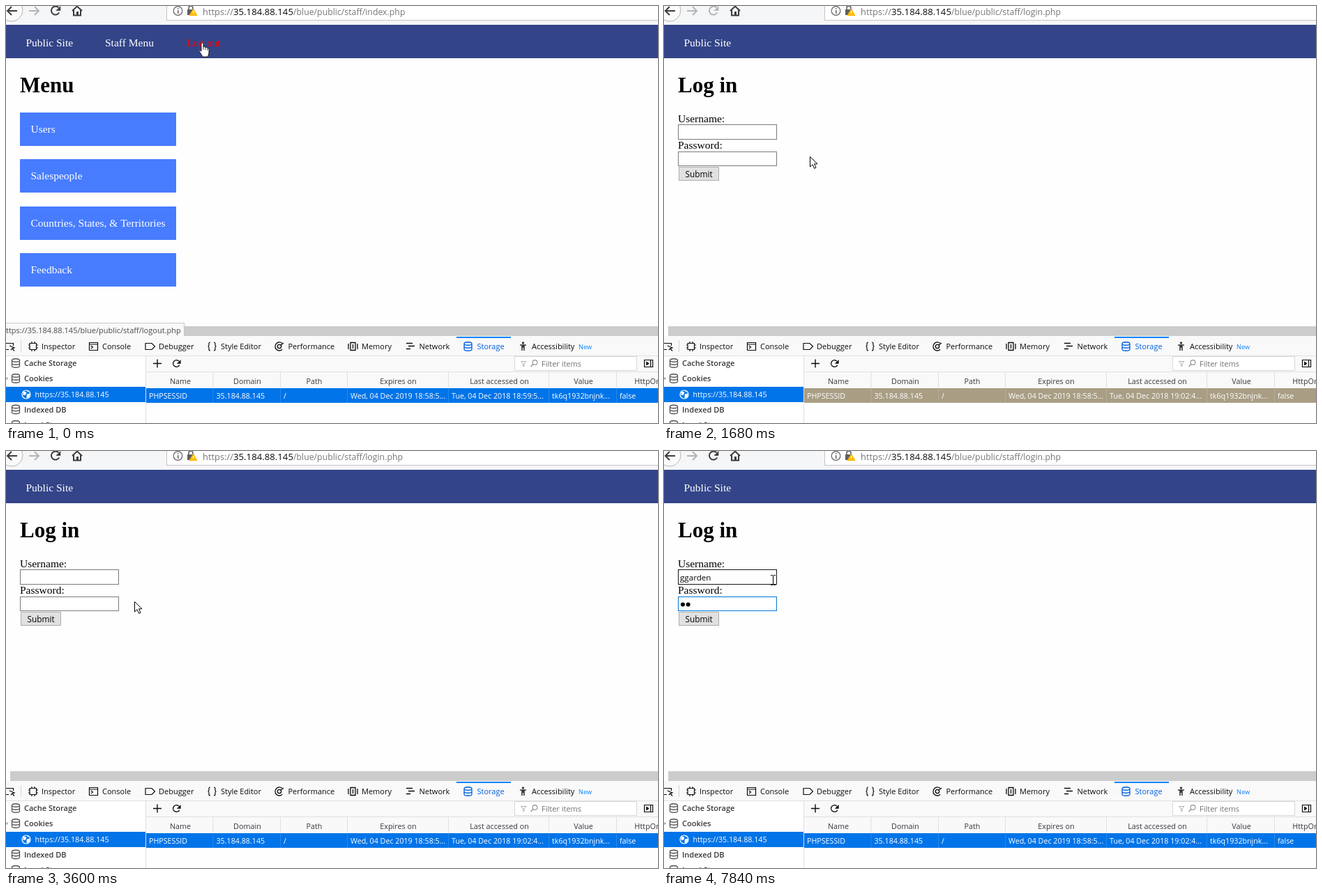
Write an HTML page with a canvas that moves like this. It is 935 by 599 pixels and loops after 7.99 s.

```html
<!DOCTYPE html>
<html lang="en">
<head>
<meta charset="utf-8">
<title>Log out and log in</title>
<style>
  html, body { margin: 0; width: 100%; height: 100%; overflow: hidden; background: #fff; }
  canvas { display: block; }
</style>
</head>
<body>
<canvas id="stage" width="935" height="599"></canvas>
<script>
const ctx = document.getElementById('stage').getContext('2d');
const LOOP = 7990;
const UI = '"Open Sans", "Noto Sans", sans-serif';
const SERIF = '"Liberation Serif", serif';
const INK = '#0c0c0d', GREY = '#b4b4b6', BLUE = '#0074e8';
const HOST = '35.184.88.145';
const USER = 'ggarden';

// The last entry whose start time has passed.
const at = (steps, t) => steps.filter(s => s[0] <= t).pop().slice(1);

const CURSOR = [
  [0, 'hand', 276, 52], [1270, 'arrow', 302, 168], [1410, 'arrow', 310, 239],
  [1560, 'arrow', 260, 238], [1680, 'arrow', 209, 216], [3600, 'arrow', 184, 216],
  [3760, 'beam', 162, 182], [3900, 'beam', 156, 178]
];
const RELOAD = [
  [0, 'reload', '#3d3d3f'], [870, 'stop', '#3d3d3f'], [1120, 'stop', '#aaa'],
  [1560, 'reload', GREY], [1950, 'reload', '#3d3d3f']
];
// typed characters and caret visibility
const NAME = [
  [0, 0, false], [4020, 0, true], [4580, 0, false], [4720, 1, true], [4840, 2, false],
  [5100, 2, true], [5240, 4, true], [5490, 5, true], [5620, 6, true], [5920, 7, false]
];
const SECRET = [
  [0, 0, false], [6190, 0, true], [6720, 0, false], [7260, 0, true],
  [7400, 1, true], [7840, 2, false]
];
const FLASH = [[0, 0], [1560, 1], [1680, .76], [1810, .51], [1950, .235], [2070, 0]];

function rect(x, y, w, h, color) {
  ctx.fillStyle = color;
  ctx.fillRect(x, y, w, h);
}

function frame(x, y, w, h, fill, border) {
  rect(x, y, w, h, border);
  rect(x + 1, y + 1, w - 2, h - 2, fill);
}

function text(str, x, y, size = 11, color = INK, family = UI, weight = 400) {
  ctx.font = `${weight} ${size}px ${family}`;
  ctx.fillStyle = color;
  ctx.fillText(str, x, y);
}

const serif = (str, x, y, color = '#000') => text(str, x, y, 15.5, color, SERIF);

function line(d, color = INK, width = 1.2, fill) {
  const path = new Path2D(d);
  if (fill) { ctx.fillStyle = fill; ctx.fill(path); }
  ctx.strokeStyle = color;
  ctx.lineWidth = width;
  ctx.stroke(path);
}

function circle(x, y, r, color, width, from = 0, to = Math.PI * 2) {
  ctx.beginPath();
  ctx.arc(x, y, r, from, to);
  ctx.strokeStyle = ctx.fillStyle = color;
  if (width) { ctx.lineWidth = width; ctx.stroke(); } else ctx.fill();
}

function reloadIcon(x, y, r, color, width) {
  circle(x, y, r, color, width, .5, 5.5);
  line(`M${x + r + 1} ${y - r} v${r} h${-r}z`, color, .6, color);
}

function database(x, y, color) {
  line(`M${x} ${y + 2} c0 -3 11 -3 11 0 v8 c0 3 -11 3 -11 0z
        M${x} ${y + 2} c0 3 11 3 11 0 M${x} ${y + 6} c0 3 11 3 11 0`, color, 1.3);
}

function browserBar(t) {
  rect(0, 0, 935, 27, '#f5f6f7');
  circle(8, 6, 16, '#fbfbfb');
  circle(8, 6, 16, '#b5b5b6', 1);
  line('M16 7 H2 M8 1 L2 7 L8 13', '#3d3d3f', 2);
  line('M33 7 H47 M41 1 L47 7 L41 13', GREY, 2);
  const [icon, color] = at(RELOAD, t);
  if (icon === 'reload') reloadIcon(71, 6.5, 6, color, 2);
  else line('M65 1 L77 13 M77 1 L65 13', color, 2);
  line('M95 7 L102 .5 L109 7 M97 6 V13.5 H107 V6', '#3d3d3f', 2);
  rect(101, 8, 3, 6, '#3d3d3f');

  frame(230, -5, 720, 26, '#fff', '#c4c4c6');
  circle(246.5, 7, 6.3, '#626264', 1.2);
  rect(246, 6, 1.5, 5, '#626264');
  rect(246, 3, 1.5, 1.6, '#626264');
  rect(260, 5, 10, 8, '#5f5f61');
  line('M262 5 V3 c0 -4 6 -4 6 0 V5', '#5f5f61', 1.6);
  line('M268.5 4.5 L274 13.5 H263z', '#ffb300', 1, '#ffbf00');
  rect(268, 7, 1.3, 3.5, '#fff');
  text('https://', 282, 12.5, 12.9, '#777');
  text(HOST, 326, 12.5, 13.2, INK);
  text(`/blue/public/staff/${t < 1270 ? 'index' : 'login'}.php`, 412, 12.5, 12.3, '#777');
}

function menuPage() {
  serif('Staff Menu', 142, 58, '#fff');
  serif('Log out', 259, 58, '#f00');
  text('Menu', 20, 124, 31, '#000', SERIF, 700);
  ['Users', 'Salespeople', 'Countries, States, & Territories', 'Feedback'].forEach((label, i) => {
    const y = Math.round(153 + i * 67.4);
    rect(20, y, 224, 48, '#477cff');
    serif(label, 35.5, y + 29, '#fff');
  });
}

function caret(x, y, h) {
  rect(Math.floor(x), y, 1, h, '#000');
}

function loginPage(t) {
  text('Log in', 20, 124, 31, '#000', SERIF, 700);
  serif('Username:', 20, 167);
  const pressed = t >= 4020 && t < 4170;
  frame(20, 170, 142, 22, '#fff', pressed ? '#0078d7' : t >= 3900 ? '#171717' : '#7a7a7a');
  serif('Password:', 20, 205);
  frame(20, 209, 142, 21, '#fff', t >= 6190 ? '#0078d7' : '#7a7a7a');
  frame(21, 231, 58, 20, '#e1e1e1', '#adadad');
  text('Submit', 30.5, 245.5, 11.8, '#000');

  const [typed, nameCaret] = at(NAME, t);
  const shown = USER.slice(0, typed);
  text(shown, 23, 186, 11.6, '#000');
  if (nameCaret) caret(23 + ctx.measureText(shown).width, 173, 16);

  const [dots, secretCaret] = at(SECRET, t);
  for (let i = 0; i < dots; i++) circle(27 + i * 7.6, 220.5, 3, '#000');
  if (secretCaret) caret(23 + dots * 8, 212, 15);

  if (t >= 4720 && t < 6190) {
    rect(22, 194, 143, 21, 'rgba(0,0,0,.12)');
    rect(21, 193, 143, 21, 'rgba(0,0,0,.18)');
    frame(20, 192, 142, 21, '#fff', '#a0a0a0');
    text(USER, 24, 206.5, 11, '#000');
  }
}

function statusBubble() {
  frame(-2, 455, 258, 21, '#f9f9fa', '#c8c8c8');
  text(`ttps://${HOST}/blue/public/staff/logout.php`, 0, 470, 11, '#4a4a4f');
}

function toolTabs() {
  rect(0, 474, 935, 28, '#f9f9fa');
  rect(0, 502, 935, 1, '#e0e0e2');
  line('M0 484.5 H10.5 V488 M0 493.5 H4 M5 488 L12 491 L9 492 L12 495.5 M9 492 L7 494z', INK, 1.2);
  rect(21, 480, 1, 17, '#d4d4d6');
  const tabs = [['Inspector', 51], ['Console', 138], ['Debugger', 219], ['Style Editor', 308],
    ['Performance', 404.5], ['Memory', 510], ['Network', 592.5], ['Accessibility', 754]];
  tabs.forEach(([label, x]) => text(label, x, 493));
  rect(646, 475, 78, 2, '#0a84ff');
  text('Storage', 675.5, 493, 11, '#0060df');
  text('New', 821, 493, 9.2, '#0a84ff');

  line('M34 484.5 H43.5 V493.5 H34z M32 487 H34 M32 491 H34 M43 487 H46 M43 491 H46 M37 482 V484 M41 482 V484 M37 494 V496 M41 494 V496');
  line('M119.5 483.5 H131.5 V494.5 H119.5z M119.5 486 H131.5 M122 488 L124.5 490 L122 492');
  line('M200 484.5 H209 L213.5 489 L209 493.5 H200z');
  line('M293 483 q-2 0 -2 2 v2 q0 2 -1.5 2 q1.5 0 1.5 2 v2 q0 2 2 2 M298 483 q2 0 2 2 v2 q0 2 1.5 2 q-1.5 0 -1.5 2 v2 q0 2 -2 2');
  circle(392, 489, 6, INK, 1.3, .8, 5.4);
  circle(392, 489, 2.7, INK, 1.3);
  line('M394 487 L398 484', INK, 1.5);
  line('M494 483.5 H501 V494.5 H494z M491 485 V493 M504 485 V493 M497.5 486 V492', INK, 1.3);
  line('M574 484.5 H583 M577 488.5 H586 M574 492.5 H580', INK, 1.3);
  database(657, 483, '#0060df');
  circle(741.5, 484, 1.7, '#38383d');
  line('M737 487 H746 M741.5 487 V491 M740 487 V495 M743 487 V495', '#38383d', 1.6);
}

function sidebar() {
  rect(0, 503, 200, 96, '#fff');
  rect(0, 547, 200, 22, BLUE);
  rect(200, 503, 1, 96, '#e0e0e2');
  [['Cache Storage', 517], ['Cookies', 539], ['Indexed DB', 583.5], ['Local Storage', 606]].forEach(([label, y]) => {
    database(8.5, y - 10, '#55555a');
    text(label, 26, y, 11, '#38383d', UI, 600);
  });
  line('M0 534 h3 l-2 3z', '#aaa', .6, '#aaa');
  circle(29, 558, 6, '#fff', 1.2);
  line('M25 554 l4 1 l-1 3 l-3 1z M30 558 l4 -1 l-1 4 l-3 2z M30 553 l3 1', '#fff', .8, '#fff');
  text(`https://${HOST}`, 41.5, 561.5, 10.7, '#fff');
}

function storageTable(t) {
  rect(201, 503, 734, 23, '#f9f9fa');
  line('M211 513.5 H223 M217 507.5 V519.5', INK, 1.4);
  reloadIcon(244.5, 513.5, 4.8, INK, 1.4);
  frame(729, 503, 176, 21, '#fff', '#d7d7db');
  line('M738.5 510.5 H746 L743 514 V518 L741.5 517 V514z', '#b1b1b3', 1);
  circle(758.5, 512, 3.4, '#8f8f91', 1.1);
  line('M756 514.5 L752.5 518', '#8f8f91', 1.2);
  text('Filter items', 768, 518, 11, '#737373');
  line('M915.5 508.5 H927.5 V518.5 H915.5z M924.5 508.5 V518.5', INK, 1.2);
  line('M918.5 511 L922 513.5 L918.5 516z', INK, .8, INK);

  rect(201, 525, 734, 24, '#f9f9fa');
  rect(201, 525, 734, 1, '#e0e0e2');
  const [k] = at(FLASH, t);
  const mix = (a, b) => Math.round(a + (b - a) * k);
  rect(201, 549, 734, 21, `rgb(${mix(0, 222)},${mix(116, 171)},${mix(232, 101)})`);
  const accessed = t < 1560 ? '18:59:5' : '19:02:4';
  const columns = [
    ['Name', 250, 205, 'PHPSESSID'], ['Domain', 346, 301.5, HOST], ['Path', 442, 398, '/'],
    ['Expires on', 562.5, 494, 'Wed, 04 Dec 2019 18:58:5...'],
    ['Last accessed on', 707.5, 639, `Tue, 04 Dec 2018 ${accessed}...`],
    ['Value', 828, 783, 'tk6q1932bnjnk...'], ['HttpOnly', 924, 880, 'false']
  ];
  columns.forEach(([head, mid, x, value], i) => {
    ctx.textAlign = 'center';
    text(head, mid, 543, 10.8, '#38383d');
    ctx.textAlign = 'left';
    text(value, x, 564, 10.7, '#fff');
    if (i) {
      rect(x - 5, 526, 1, 23, '#e0e0e2');
      rect(x - 5, 549, 1, 21, 'rgba(255,255,255,.15)');
    }
  });
}

const POINTERS = {
  arrow() {
    line('M.5 .5 V15 L4 11.7 L6.6 17.3 L9 16.2 L6.5 10.8 H11z', '#000', 1, '#fff');
  },
  hand() {
    line('M4 13 V2 Q5.5 -.5 7 2 V7 Q9 5.5 10 7.5 Q12 6.5 12.8 8.5 Q15 8 15 10.5 V15 Q15 18 13 21 H6 Q4 17 1 13 Q.5 10.5 4 13z', '#222', 1, '#fff');
    line('M7 7 V11 M10 7.5 V11 M12.8 8.5 V12', '#222', .8);
  },
  beam() {
    line('M-3 .5 H0 M1 .5 H4 M.5 1 V14 M-3 14.5 H0 M1 14.5 H4', '#000', 1);
  }
};

function pointer(t) {
  const [kind, x, y] = at(CURSOR, t);
  ctx.save();
  ctx.translate(x, y);
  POINTERS[kind]();
  ctx.restore();
}

function draw(now) {
  const t = now % LOOP;
  rect(0, 0, 935, 599, '#fefefe');
  browserBar(t);
  rect(0, 27, 935, 48, '#334488');
  serif('Public Site', 28.5, 58, '#fff');
  rect(6, 460, 929, 14, '#ccc');
  if (t < 1270) menuPage(); else loginPage(t);
  if (t < 1270) statusBubble();
  toolTabs();
  sidebar();
  storageTable(t);
  pointer(t);
  requestAnimationFrame(draw);
}
requestAnimationFrame(draw);
</script>
</body>
</html>
```
